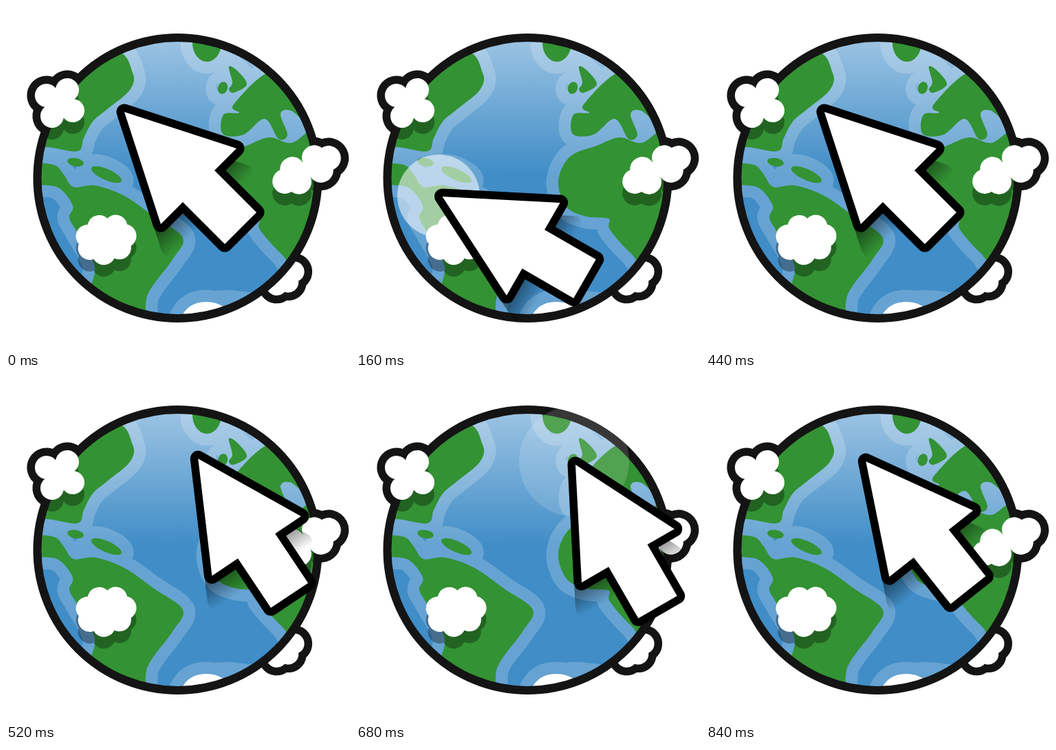
An HTML page that plays this animation: 500x500 px, repeating every 0.88 s.

```html
<!DOCTYPE html>
<html lang="en">
<head>
<meta charset="utf-8">
<title>Globe and pointer</title>
<style>
  html, body { margin: 0; width: 100%; height: 100%; overflow: hidden; background: #fff; }
  svg { display: block; width: 100vw; height: 100vh; }
</style>
</head>
<body>
<svg viewBox="0 0 500 500">
  <defs>
    <linearGradient id="sea" gradientUnits="userSpaceOnUse" x1="0" y1="46" x2="0" y2="244">
      <stop stop-color="#9dc4e3"/><stop offset="1" stop-color="#408dc7"/>
    </linearGradient>
    <linearGradient id="fadeRamp" gradientUnits="userSpaceOnUse" x1="113" y1="113" x2="138" y2="138">
      <stop stop-color="#fff" stop-opacity=".42"/><stop offset="1" stop-color="#fff" stop-opacity="0"/>
    </linearGradient>
    <mask id="fade" maskUnits="userSpaceOnUse" x="-50" y="-50" width="350" height="350">
      <rect x="-50" y="-50" width="350" height="350" fill="url(#fadeRamp)"/>
    </mask>
    <clipPath id="disk"><circle cx="249.500" cy="250" r="204"/></clipPath>
    <g id="land">
      <ellipse cx="292" cy="54" rx="21" ry="27"/>
      <ellipse cx="315" cy="119" rx="7" ry="9" transform="rotate(20 315 119)"/>
      <ellipse cx="101" cy="227" rx="12" ry="6" transform="rotate(10 101 227)"/>
      <ellipse cx="146" cy="245" rx="24" ry="8" transform="rotate(24 146 245)"/>
    </g>
    <path id="ice" d="M250 470Q256 430 291 430T335 470Z"/>
    <polygon id="arrow" stroke="#000" stroke-width="23" stroke-linejoin="round" paint-order="stroke"/>
    <g id="cloudNW"></g><g id="cloudE"></g><g id="cloudSW"></g><g id="cloudSE"></g>
  </defs>

  <g fill="#141414" stroke="#141414" stroke-width="23">
    <use href="#cloudNW"/><use href="#cloudE"/><use href="#cloudSE"/>
  </g>
  <use href="#cloudSE" fill="#fff"/>

  <g clip-path="url(#disk)">
    <rect width="500" height="500" fill="url(#sea)"/>
    <g opacity=".2" fill="#fff" stroke="#fff" stroke-width="35" stroke-linejoin="round">
      <use href="#land"/><use href="#ice"/>
      <path d="M262 452Q290 424 340 432T400 416" fill="none"/>
    </g>
    <use href="#land" fill="#339233"/>
    <use href="#ice" fill="#fff"/>
    <g transform="translate(0 17)">
      <use href="#cloudNW" opacity=".32"/><use href="#cloudE" opacity=".32"/><use href="#cloudSW" opacity=".32"/>
    </g>
  </g>
  <circle cx="249.500" cy="250" r="204" fill="none" stroke="#141414" stroke-width="12"/>
  <g fill="#fff"><use href="#cloudNW"/><use href="#cloudE"/><use href="#cloudSW"/></g>

  <circle id="ripple" fill="#fff"/>
  <g id="pointer">
    <g mask="url(#fade)"><use href="#arrow" x="12" y="35"/></g>
    <use href="#arrow" fill="#fff"/>
  </g>
</svg>
<script>
const $ = id => document.getElementById(id);

// Closed Catmull-Rom curve through "x,y x,y ..." key points
function coast(text) {
  const pts = text.split(' ').map(p => p.split(',').map(Number)), n = pts.length;
  const at = i => pts[(i + n) % n];
  let d = 'M' + pts[0];
  for (let i = 0; i < n; i++) {
    const [a, b, c, e] = [at(i - 1), at(i), at(i + 1), at(i + 2)];
    const c1 = b.map((v, k) => v + (c[k] - a[k]) / 6);
    const c2 = c.map((v, k) => v - (e[k] - b[k]) / 6);
    d += `C${c1} ${c2} ${c}`;
  }
  $('land').insertAdjacentHTML('beforeend', `<path d="${d}Z"/>`);
}

// Americas
coast('30,206 60,205 104,211 113,192 126,168 147,150 180,122 184,97 156,66 50,100');
coast('40,231 70,231 84,245 98,263 130,261 172,276 215,306 257,337 241,370 206,419 195,470 120,440 129,380 104,330 92,308 97,290 76,264 40,257');
// Britain, Europe, Africa
coast('324,88 337,95 350,114 331,126 324,121 329,111');
coast('388,94 331,143 339,155 316,158 315,186 345,187 376,164 396,193 409,187 399,157 414,152 445,172 450,120');
coast('455,182 415,199 383,191 350,203 311,219 294,255 306,292 335,306 367,309 369,325 400,360 430,380 480,270');

// Puffs spaced evenly round a tilted ellipse
function cloud(id, x, y, rx, ry, puff, count, tilt) {
  let shapes = `<ellipse rx="${rx}" ry="${ry}"/>`;
  for (let i = 0; i < count; i++) {
    const a = i * 2 * Math.PI / count;
    shapes += `<circle cx="${rx * Math.cos(a)}" cy="${ry * Math.sin(a)}" r="${puff}"/>`;
  }
  $(id).innerHTML = `<g transform="translate(${x} ${y}) rotate(${tilt})">${shapes}</g>`;
}
cloud('cloudNW', 78, 141, 22, 22, 17, 4, 30);
cloud('cloudE', 437, 238, 36, 12, 18, 6, -28);
cloud('cloudSW', 145, 339, 28, 20, 17, 7, -10);
cloud('cloudSE', 406, 396, 16, 7, 15, 4, -38);

// The arrow mirrors across its diagonal, with the tip at 0,0
const side = [[163, 53], [131, 85], [192, 146]];
const mirrored = side.map(([x, y]) => [y, x]).reverse();
$('arrow').setAttribute('points', [[0, 0], ...side, ...mirrored].join(' '));

const LOOP = 880, STEP = 40, HALF = LOOP / 2, TURN = 15, BEND = 0.57;
const home = [172, 154];
const clicks = [
  { end: [125.5, 277], spot: [120, 276], spin: -1 },
  { end: [319, 126], spot: [317, 121], spin: 1 }
];
const easeOut = u => 1 - (1 - Math.min(u, 1)) ** 2;

function draw(now) {
  const t = Math.floor(now % LOOP / STEP) * STEP;
  const { end, spot, spin } = clicks[t < HALF ? 0 : 1];
  const q = t % HALF;

  // Arc out, rest on the spot, arc back
  const p = easeOut(Math.min(q, HALF - q) / 160);
  const dx = end[0] - home[0], dy = end[1] - home[1];
  const bow = spin * BEND * p * (1 - p);
  const x = home[0] + p * dx + bow * dy, y = home[1] + p * dy - bow * dx;
  $('pointer').setAttribute('transform', `translate(${x} ${y}) rotate(${spin * TURN * p})`);

  const age = q - 80, ripple = $('ripple');
  ripple.setAttribute('cx', spot[0]);
  ripple.setAttribute('cy', spot[1]);
  ripple.setAttribute('r', age > 0 ? 80 * easeOut(age / 160) : 0);
  ripple.setAttribute('opacity', Math.max(0, 0.95 - age / 200));
}

const start = performance.now();
(function tick() {
  draw(performance.now() - start);
  requestAnimationFrame(tick);
})();
</script>
</body>
</html>
```
